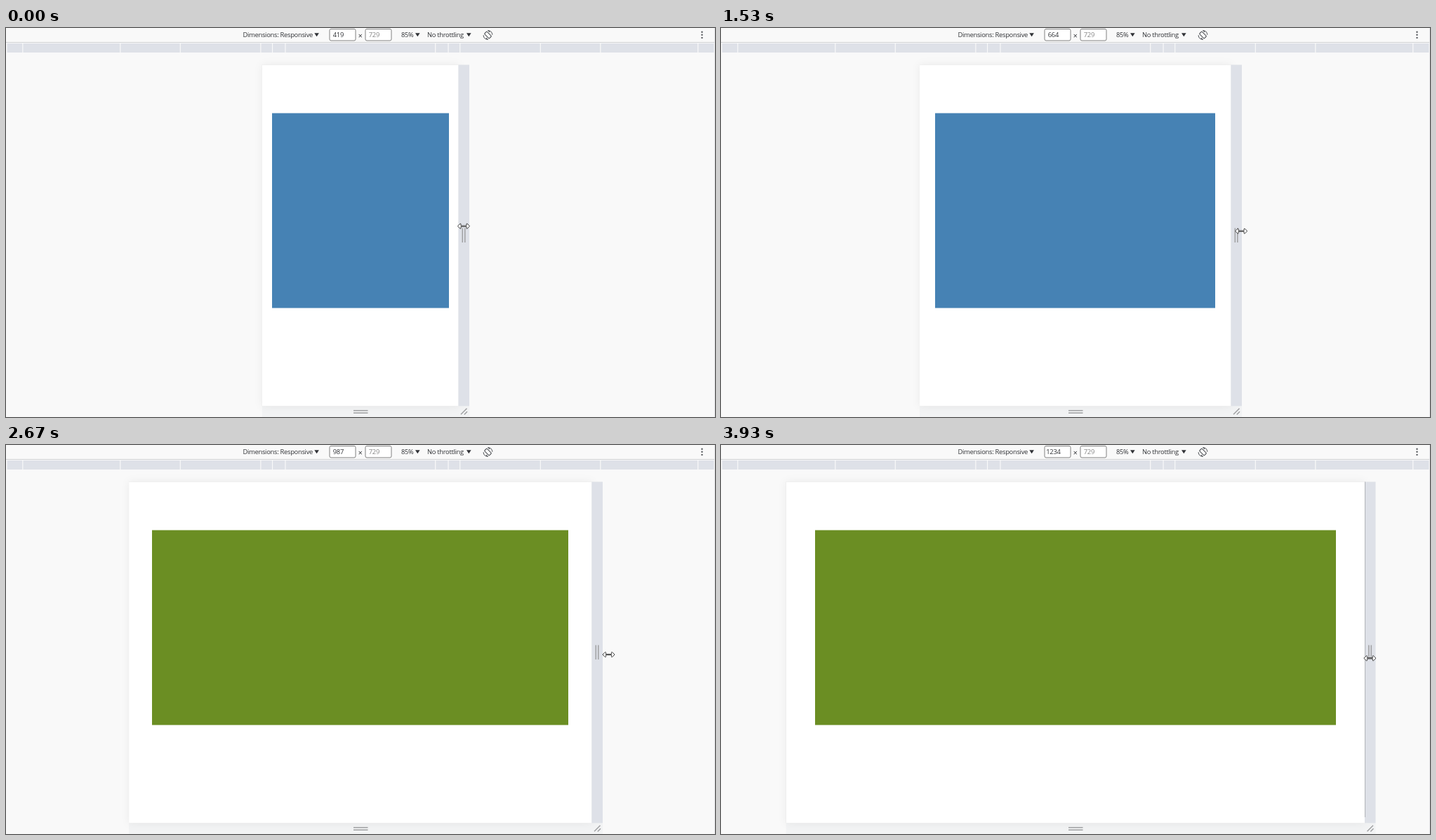
Recreate the animation shown at these times as an HTML page. Size 1010 by 555 pixels, loop 5.34 s.

```html
<!DOCTYPE html>
<html lang="en">
<head>
<meta charset="utf-8">
<title>Responsive viewport</title>
<style>
  html, body { margin: 0; width: 100%; height: 100%; overflow: hidden; background: #f9f9f9; }
  svg { display: block; width: 1010px; height: 555px; }
  text { font: 9.4px "Open Sans", "Noto Sans", sans-serif; letter-spacing: -.3px; fill: #303236; }
  .mid { text-anchor: middle; }
  .field { fill: #fff; stroke: #808080; }
  .grip { fill: none; stroke: #a0a1a3; stroke-width: 1.5; }
  #page { filter: drop-shadow(0 0 .6px rgba(0,0,0,.16)) drop-shadow(0 0 6px rgba(0,0,0,.06)); }
</style>
</head>
<body>
<svg viewBox="0 0 1010 555">
  <rect width="1010" height="555" fill="#f9f9f9"/>
  <g id="ruler"></g>
  <path d="M0 20.5H1010" stroke="#cfd1d4"/>
  <path d="M1009.5 0V555" stroke="#e3e4e6"/>

  <text x="337.5" y="13.3">Dimensions: Responsive</text>
  <text x="563" y="13.3">85%</text>
  <text x="600" y="13.3">No throttling</text>
  <path d="M439.3 7.3h6.6l-3.3 5zM583 7.3h6.6l-3.3 5zM656 7.3h6.6l-3.3 5z" fill="#303236"/>
  <rect class="field" x="461" y="1.5" width="37" height="16.5" rx="2"/>
  <rect class="field" x="512" y="1.5" width="37" height="16.5" rx="2"/>
  <text id="size" class="mid" x="473.4" y="13.3"></text>
  <text class="mid" x="524.4" y="13.3" style="fill:#858585">729</text>
  <text class="mid" x="504.7" y="14.5" style="font-size:10.5px">×</text>

  <g transform="translate(686.5 10)" fill="none" stroke="#55585c" stroke-width="1.1">
    <rect x="-2.4" y="-4.8" width="4.8" height="9.6" rx=".8" transform="rotate(-45)"/>
    <path d="M2.5 -4L.5 -6.4A6.4 6.4 0 0 1 6.4 -.3M-2.5 4L-.5 6.4A6.4 6.4 0 0 1 -6.4 .3"/>
  </g>
  <g fill="#5a5d61">
    <circle cx="991.5" cy="5.7" r="1.2"/><circle cx="991.5" cy="9.8" r="1.2"/><circle cx="991.5" cy="13.9" r="1.2"/>
  </g>

  <rect id="strip" y="540" height="15" fill="#f2f3f4"/>
  <rect id="page" y="52.5" height="487" fill="#fff"/>
  <rect id="block" y="121.5" height="278"/>
  <g id="bar">
    <rect y="52.5" width="15.5" height="487" fill="#dee1e8"/>
    <rect id="seam" y="52.5" width="1" height="478.5" fill="#a9abae"/>
    <path class="grip" d="M5.8 285.5V306M9.3 285.5V306"/>
    <path class="grip" d="M3.5 551.2L12 542.7M8.3 551.5L12.5 547.3"/>
  </g>
  <path class="grip" d="M495 545.8H515.5M495 549.3H515.5"/>
  <path id="cursor" d="M-8.6 0L-5 -3.5Q-4 -4 -4 -2.7V-.6H4V-2.7Q4 -4 5 -3.5L8.6 0L5 3.5Q4 4 4 2.7V.6H-4V2.7Q-4 4 -5 3.5Z"
        fill="#fff" stroke="#2b2b2b" stroke-width=".9" stroke-linejoin="round"/>
</svg>
<script>
const LOOP = 5340, START = 533.33, STEP = 66.667, LAST = 51;
const ZOOM = .668, CENTER = 504.8, BREAKPOINT = 768;

// key points of the drag: step, viewport width, cursor x
const DRAG = [
  [-1, 419, 652], [2, 462, 673], [11, 600, 717.5], [16, 680, 747],
  [20, 805, 785.3], [32, 987, 858.5], [42, 1179, 912.3], [51, 1234, 924.4]
];

const $ = id => document.getElementById(id);
const set = (id, attrs) => {
  for (const name in attrs) $(id).setAttribute(name, attrs[name]);
};

// ruler marks stand at common device widths, mirrored about the center
const offsets = [320, 375, 425, 768, 1024, 1440].map(w => w * ZOOM / 2);
const marks = [1, ...offsets.map(o => CENTER - o).reverse(), ...offsets.map(o => CENTER + o), 1009];
$('ruler').innerHTML = marks.slice(1).map((end, i) =>
  `<rect x="${marks[i] + .6}" y="22" width="${end - marks[i] - 1.2}" height="13" fill="#dee1e8"/>`).join('');

function pose(step) {
  const i = Math.max(1, DRAG.findIndex(key => key[0] >= step));
  const a = DRAG[i - 1], b = DRAG[i];
  const p = (step - a[0]) / (b[0] - a[0]);
  return a.map((v, n) => v + (b[n] - v) * p);
}

// a box of the given width about the center, on whole pixels
function span(width) {
  const x = Math.round(CENTER - width / 2);
  return { x, width: Math.round(CENTER + width / 2) - x };
}

function draw(time) {
  // step times fall on a 10 ms grid
  const step = Math.max(-1, Math.min(LAST, Math.floor((time % LOOP + 5 - START) / STEP)));
  const [, w, x] = pose(step);
  const width = w * ZOOM, left = CENTER - width / 2, right = CENTER + width / 2;
  const edge = Math.round(right * 2) / 2;

  $('size').textContent = Math.round(w);
  set('page', { x: left, width });
  set('strip', { x: left, width: width + 15.5 });
  set('block', { ...span(width * .9), fill: w < BREAKPOINT ? '#4682b4' : '#6b8e23' });
  set('bar', { transform: `translate(${edge} 0)` });
  // the seam shows when the page ends close to a whole pixel
  set('seam', { opacity: Math.max(0, 1 - 4 * Math.abs(right - Math.round(right))) });
  set('cursor', { transform: `translate(${x} ${282.7 + (x - 652) * .079})` });
}

const begin = performance.now();
function tick() {
  draw(performance.now() - begin);
  requestAnimationFrame(tick);
}
tick();
</script>
</body>
</html>
```
